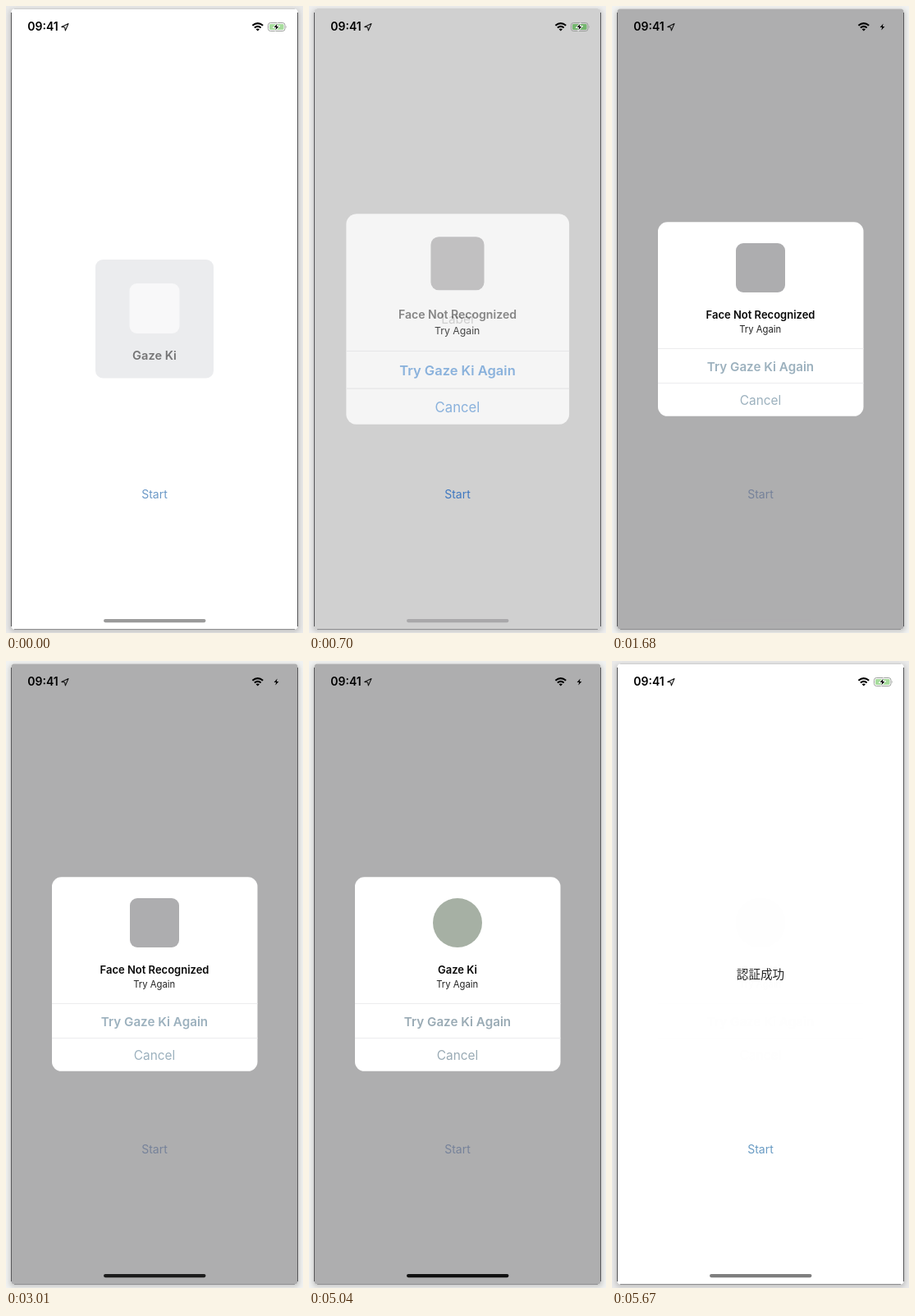
Recreate the animation shown at these times as an HTML page. Size 362 px wide and 764 px high, loop 5.74 s.

```html
<!DOCTYPE html>
<html lang="en">
<head>
<meta charset="utf-8">
<title>Face unlock dialog</title>
<style>
html, body { margin: 0; width: 100%; height: 100%; overflow: hidden; background: #e8e8e8; }
svg { display: block; width: 362px; height: 764px; }
text { font-family: Inter, Roboto, sans-serif; text-anchor: middle; }
.bold { font-weight: 600; }
.jp { font-family: "Noto Sans CJK JP", "Noto Sans CJK", sans-serif; }
</style>
</head>
<body>
<svg viewBox="0 0 362 764" xmlns="http://www.w3.org/2000/svg">
  <defs>
    <filter id="soft" x="-40%" y="-40%" width="180%" height="180%"><feGaussianBlur stdDeviation="1.1"/></filter>
    <filter id="shade" x="-10%" y="-5%" width="120%" height="110%"><feGaussianBlur stdDeviation="3"/></filter>
    <radialGradient id="glow">
      <stop offset="0.3" stop-color="#8fe0fb" stop-opacity="0.5"/>
      <stop offset="1" stop-color="#c8f2ff" stop-opacity="0"/>
    </radialGradient>
    <linearGradient id="ring" x1="0" y1="0" x2="1" y2="1">
      <stop offset="0" stop-color="#6bb8f8"/>
      <stop offset="0.55" stop-color="#3f86ee"/>
      <stop offset="1" stop-color="#2f62e0"/>
    </linearGradient>
  </defs>

  <rect id="desk" width="362" height="764"/>
  <rect x="5" y="5" width="352" height="757" rx="4" fill="#000" opacity="0.2" filter="url(#shade)"/>
  <rect x="6.5" y="3.5" width="349" height="756" rx="4" fill="#fff"/>
  <text id="label" x="181" y="387"></text>
  <rect id="dim" x="6.5" y="3.5" width="349" height="756" rx="4" fill="#020005"/>
  <path d="M6.5 8V756M355.5 8V756" stroke="#58585a"/>
  <path d="M10 759.5H352" stroke="#8e8e90"/>
  <path d="M10 3.5H352" stroke="#d0d0d0"/>

  <g id="status">
    <text class="bold" x="45" y="30.3" font-size="14">09:41</text>
    <path d="M76 21.5L67.8 25.4L71.6 26L72.4 29.9Z" fill="none" stroke="#111" stroke-width="1.1" stroke-linejoin="round"/>
    <g fill="none" stroke="#000" stroke-width="2.1">
      <path d="M300.4 23.7Q306.8 18.4 313.2 23.7"/>
      <path d="M302.9 26.5Q306.8 23.4 310.7 26.5"/>
    </g>
    <path d="M304.6 28.2Q306.8 26.6 309 28.2L306.8 30.5Z"/>
    <g id="battery">
      <rect x="319.5" y="20.5" width="20.5" height="10" rx="2.8" fill="none" stroke="#9b9f9b"/>
      <rect id="charge" x="321" y="22" width="17.5" height="7" rx="1.4"/>
      <path d="M341.2 23.8Q342.6 25.5 341.2 27.2Z" fill="#9b9f9b"/>
      <path d="M331 20.6L326 26.3H329L328 30.4L333 24.7H330Z" stroke="#fff" stroke-width="1.3"/>
    </g>
    <path d="M330.6 21.6L326.6 26H329.2L328.3 29.5L332.4 25H329.8Z"/>
  </g>

  <text id="start" x="181" y="600.3" font-size="14">Start</text>

  <g id="hud">
    <rect x="109" y="309" width="144" height="144.5" rx="9" fill="#ebecee"/>
    <rect id="hudMark" x="150.5" y="338" width="61" height="61" rx="9"/>
    <text id="hudName" class="bold" x="181" y="431" font-size="14.6">Gaze Ki</text>
  </g>

  <g id="alert">
    <rect x="56" y="263.3" width="250.5" height="236.5" rx="11.5" fill="#fff"/>
    <path d="M56 417.5H306.5M56 459.5H306.5" stroke="#ececee"/>
    <rect id="mark" x="151" y="289" width="60" height="60"/>
    <g id="orb" filter="url(#soft)">
      <circle cx="177" cy="318" r="34" fill="url(#glow)"/>
      <ellipse id="outer" fill="#6fb6f8" fill-opacity="0.4" stroke="url(#ring)" stroke-width="3"/>
      <ellipse id="inner" fill="#e6f0fc" fill-opacity="0.75" stroke="#5d94ee" stroke-width="2"/>
    </g>
    <text id="title" class="bold" x="181" y="380.7" font-size="13"></text>
    <text x="180.7" y="398.4" font-size="11.3" fill="#222">Try Again</text>
    <text id="retry" class="bold" x="181" y="444.6" font-size="15.2">Try Gaze Ki Again</text>
    <text id="cancel" x="181" y="486" font-size="15.4">Cancel</text>
  </g>

  <rect id="home" x="119" y="747" width="124.5" height="4.2" rx="2.1"/>
</svg>
<script>
const LOOP = 5740, OPEN = 635, RETRY = 3800, DONE = 4620, CLOSE = 5150;
const $ = id => document.getElementById(id);
const set = (id, attrs) => {
  for (const k in attrs) $(id).setAttribute(k, attrs[k]);
};
const clamp = v => Math.max(0, Math.min(1, v));
const ramp = (t, a, b) => {
  const v = clamp((t - a) / (b - a));
  return v * v * (3 - 2 * v);
};
// Fast start, long settling tail.
const settle = (t, from, tau) => t < from ? 0 : 1 - Math.exp((from - t) / tau);

function mix(a, b, v) {
  const part = (c, i) => parseInt(c.substr(1 + 2 * i, 2), 16);
  return "rgb(" + [0, 1, 2].map(i => Math.round(part(a, i) + (part(b, i) - part(a, i)) * v)) + ")";
}
function colour(t, stops) {
  let i = 0;
  while (i < stops.length - 2 && t >= stops[i + 1][0]) i++;
  const [t0, a] = stops[i], [t1, b] = stops[i + 1];
  return mix(a, b, clamp((t - t0) / (t1 - t0)));
}

const startStops = [[0, "#6c99c7"], [200, "#3f7fd0"], [700, "#3f78c0"], [1000, "#76829a"],
  [CLOSE, "#76829a"], [5500, "#6a9cc4"]];
const homeStops = [[0, "#9b9b9b"], [700, "#a9a8aa"], [1000, "#aeadaf"], [1750, "#aeadaf"],
  [2500, "#222222"], [4000, "#111111"], [CLOSE, "#111111"], [5600, "#7f7f7f"]];
const buttonStops = [[0, "#78aae0"], [700, "#78aae0"], [1100, "#9cb1be"], [RETRY, "#9cb1be"],
  [4000, "#8ba9c6"], [DONE, "#8ba9c6"], [4850, "#9aabb5"]];
const markStops = [[0, "#bdbcbe"], [700, "#bdbcbe"], [1100, "#adadaf"], [RETRY, "#adadaf"], [DONE, "#a6b0a4"]];

function drawOrb(t) {
  const a = (t - 4060) / 1000 * Math.PI * 2;
  set("outer", {
    rx: 25 + 2 * Math.sin(a), ry: 30.5 - Math.sin(a),
    transform: `translate(${181 + 4 * Math.cos(a)} 320) rotate(${25 + a * 40})`
  });
  set("inner", {
    rx: 13 + 7 * Math.sin(a) ** 2, ry: 26,
    transform: `translate(${181 + 3 * Math.cos(a)} 319) rotate(${11 + a * 30})`
  });
}

function draw(t) {
  const shown = settle(t, OPEN, 77), gone = settle(t, CLOSE, 85);
  const p = shown * (1 - gone);
  const retried = t >= RETRY, passed = t >= CLOSE;

  set("desk", { fill: mix("#e9e9e9", "#f1f2f1", p) });
  set("dim", { opacity: 0.318 * p });
  set("battery", { opacity: clamp((1 - p) * 2.4) });
  set("charge", { fill: mix("#a6dc9c", "#4f9a4c", p) });
  set("start", { fill: colour(t, startStops) });
  set("home", { fill: colour(t, homeStops) });

  const label = $("label");
  label.textContent = passed ? "認証成功" : "Label";
  set("label", { class: passed ? "jp" : "", "font-size": passed ? 14.6 : 15.4, fill: "#222" });

  const lit = ramp(t, 0, 180);
  set("hud", { opacity: 1 - ramp(t, 520, 690) });
  set("hudMark", { fill: mix("#f8f8f9", "#a4a4a7", lit) });
  set("hudName", { fill: mix("#747475", "#2a2a2b", lit) });

  const scale = 1 + 0.2 * (1 - shown);
  set("alert", {
    opacity: clamp(shown * 1.37) * (1 - gone),
    transform: `translate(181.2 381.5) scale(${scale}) translate(-181.2 -381.5)`
  });
  $("title").textContent = retried ? "Gaze Ki" : "Face Not Recognized";
  set("title", { fill: mix("#777777", "#080808", ramp(t, 660, 980)) });
  set("retry", { fill: colour(t, buttonStops) });
  set("cancel", { fill: colour(t, buttonStops) });

  const spin = ramp(t, RETRY, 3990) * (1 - ramp(t, DONE, 4800));
  set("mark", { rx: t < 4200 ? 9 : 30, fill: colour(t, markStops), opacity: 1 - spin });
  set("orb", { opacity: spin });
  drawOrb(t);
}

const begin = performance.now();
function tick() {
  draw((performance.now() - begin) % LOOP);
  requestAnimationFrame(tick);
}
draw(0);
requestAnimationFrame(tick);
</script>
</body>
</html>
```
